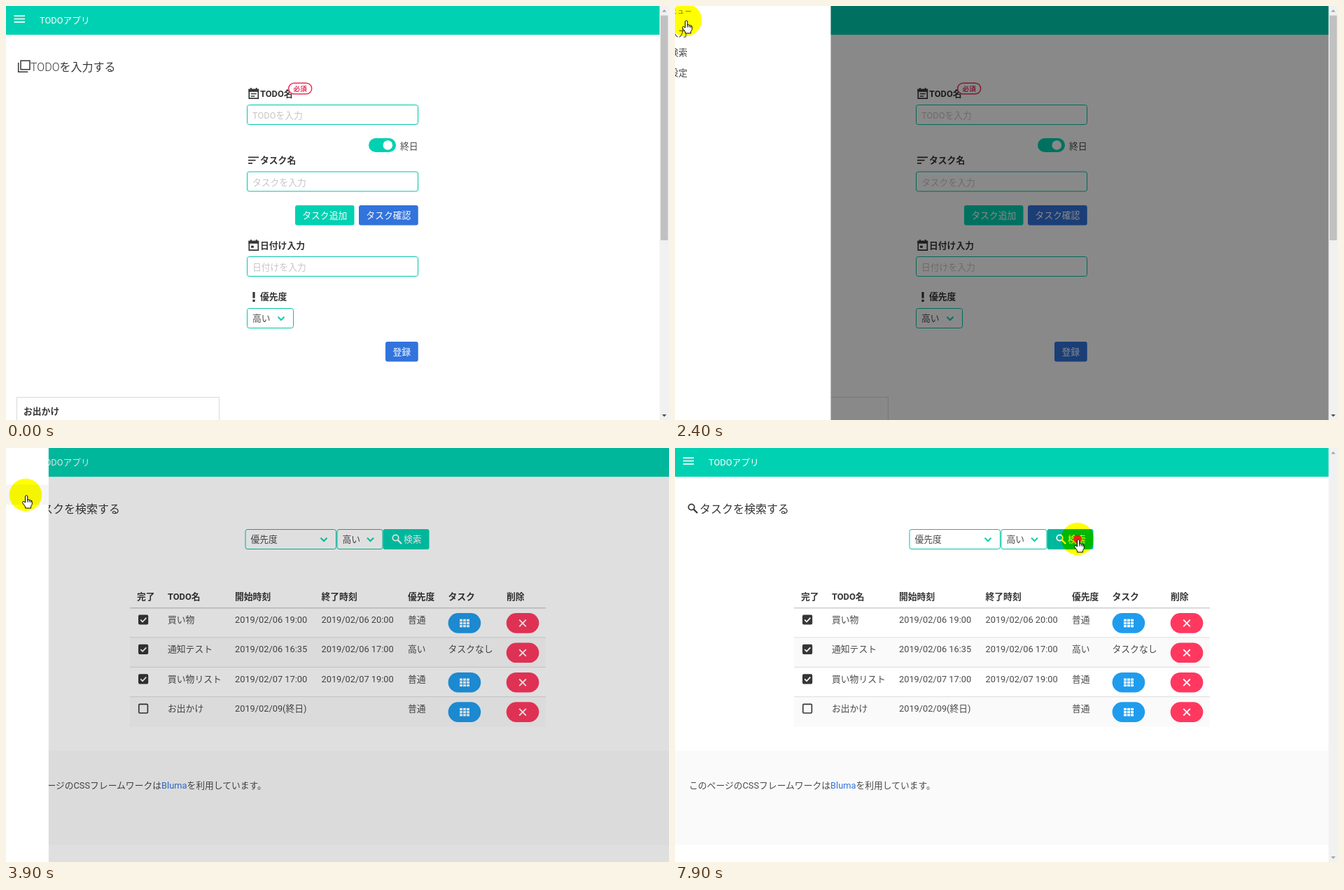
Recreate the animation shown at these times as an HTML page. Size 947x592 px, loop 8 s.

```html
<!DOCTYPE html>
<html lang="ja">
<head>
<meta charset="utf-8">
<title>TODOアプリ</title>
<style>
  html, body { margin: 0; width: 100%; height: 100%; overflow: hidden; background: #fff; }
  svg { display: block; }
  text { font: 400 12.8px Roboto, "Noto Sans CJK JP", "Noto Sans CJK", sans-serif; fill: #4a4a4a; }
  .bold { font-weight: 700; fill: #363636; }
  .title { font-size: 16px; font-weight: 300; fill: #363636; }
  .hint { fill: #c6c6c6; }
  .white { fill: #fff; }
  .mid { text-anchor: middle; }
  .tag { font-size: 9.6px; font-weight: 700; fill: #e8315b; }
  .small { font-size: 9.6px; letter-spacing: .96px; fill: #7a7a7a; }
  .box { fill: #fff; stroke: #00c4a7; }
  .line { fill: none; stroke: #363636; stroke-width: 1.7; }
  .cursor { fill: #fff; stroke: #000; stroke-linejoin: round; }
  #glow { fill: #ff0; mix-blend-mode: multiply; }
</style>
</head>
<body>
<svg id="stage" width="947" height="592" viewBox="0 0 947 592"></svg>
<script>
const PRIMARY = '#00d1b2', HOVER = '#00c4a7', ACTIVE = '#00b89c';
const BLUE = '#3273dc', INFO = '#209cee', RED = '#ff3860', DARK = '#363636';

const text = (x, y, s, cls = '') => `<text x="${x}" y="${y}" class="${cls}">${s}</text>`;
const rect = (x, y, w, h, fill, rx = 0, more = '') =>
  `<rect x="${x}" y="${y}" width="${w}" height="${h}" rx="${rx}" fill="${fill}" ${more}/>`;
const path = (d, cls = 'line', more = '') => `<path d="${d}" class="${cls}" ${more}/>`;
const box = (x, y, w) => `<rect x="${x + .5}" y="${y + .5}" width="${w - 1}" height="28" rx="3" class="box"/>`;
const field = (y, hint) => box(344, y, 245) + text(352, y + 20, hint, 'hint');
const chevron = (x, y) => path(`M${x - 4.5} ${y - 2.5}l4.5 4.5 4.5-4.5`, '',
  `fill="none" stroke="${PRIMARY}" stroke-width="2"`);
const select = (x, y, w, label) => box(x, y, w) + text(x + 8, y + 19, label) + chevron(x + w - 18, y + 15);
const button = (x, y, w, label, fill) =>
  rect(x, y, w, 28.6, fill, 3) + text(x + w / 2, y + 19, label, 'white mid');
const magnifier = (x, y, color) =>
  `<g fill="none" stroke="${color}"><circle cx="${x + 5}" cy="${y + 5}" r="4.2" stroke-width="1.8"/>` +
  `<path d="M${x + 8} ${y + 8}l5.5 5.5" stroke-width="2.3"/></g>`;
const calendar = (y, inner) =>
  path(`M347.3 ${y + 2.5}h13v12.7h-13z`) +
  path(`M346.5 ${y + 1.7}h14.6v4h-14.6zM349 ${y}h1.8v3h-1.8zM356.8 ${y}h1.8v3h-1.8z`, '', `fill="${DARK}"`) +
  path(inner);

const inputPage = () => `
  ${path('M21 78.3h13v12.4h-13zM17.7 81v13.2h13.6', 'line', 'style="stroke-width:1.5"')}
  ${text(35, 92.5, 'TODOを入力する', 'title')}
  ${rect(15.5, 559.5, 289, 60, '#fff', 0, 'stroke="#dadada"')}
  ${text(25, 583.5, 'お出かけ', 'bold')}
  <g class="centred">
    ${calendar(117, 'M349.8 125.5h8M349.8 129h5.5')}${text(363, 130, 'TODO名', 'bold')}
    ${rect(403.7, 110.2, 33, 15.6, '#fff', 7.8, 'stroke="#e8315b" stroke-width="1.5"')}
    ${text(420.2, 121.7, '必須', 'tag mid')}
    ${field(141, 'TODOを入力')}
    ${rect(518, 189, 39, 20, PRIMARY, 10)}<circle cx="545.3" cy="199" r="6.8" fill="#fff"/>
    ${text(563, 205, '終日')}
    ${path('M346 216.3h15M346 220.6h10.5M346 224.9h6')}${text(363, 225, 'タスク名', 'bold')}
    ${field(236.5, 'タスクを入力')}
    ${button(413, 285, 84.5, 'タスク追加', PRIMARY)}${button(504, 285, 84.7, 'タスク確認', BLUE)}
    ${calendar(334, 'M350 343.5h3.8M350 345h3.8')}${text(363, 346.8, '日付け入力', 'bold')}
    ${field(358, '日付けを入力')}
    ${path('M352.4 409h3.2v8.8h-3.2zM352.4 419.8h3.2v3.2h-3.2z', '', `fill="${DARK}"`)}
    ${text(363, 420.3, '優先度', 'bold')}
    ${select(344, 432, 67, '高い')}
    ${button(542, 480, 46.7, '登録', BLUE)}
  </g>`;

const columns = [180, 224, 320, 443.5, 567, 624.5, 708];
const headings = ['完了', 'TODO名', '開始時刻', '終了時刻', '優先度', 'タスク', '削除'];
const rows = [
  ['買い物', '2019/02/06 19:00', '2019/02/06 20:00', '普通', ''],
  ['通知テスト', '2019/02/06 16:35', '2019/02/06 17:00', '高い', 'タスクなし'],
  ['買い物リスト', '2019/02/07 17:00', '2019/02/07 19:00', '普通', ''],
  ['お出かけ', '2019/02/09(終日)', '', '普通', ''],
];

function tableRow(cells, i) {
  const top = 229 + i * 42.4, mid = top + 21.4, done = i < 3;
  let out = i % 2 ? rect(170, top, 594, 42.4, '#fafafa') : '';
  out += rect(170, top - 1, 594, i ? 1 : 1.5, i ? '#dbdbdb' : '#cfcfcf');
  out += rect(182.8, mid - 11.2, 12.6, 12.6, done ? DARK : 'none', 1.2, `stroke="${DARK}" stroke-width="1.6"`);
  if (done) out += path(`M185.2 ${mid - 4.8}l2.9 2.9 5.2-5.6`, '', 'fill="none" stroke="#fff" stroke-width="1.7"');
  out += cells.map((s, c) => text(columns[c + 1], mid - .4, s)).join('');
  if (!cells[4]) {
    out += rect(624.6, mid - 14.3, 46.6, 28.6, INFO, 14.3);
    for (let k = 0; k < 9; k++)
      out += rect(641 + k % 3 * 5, mid - 5.7 + Math.floor(k / 3) * 4.2, 4, 3.2, '#fff');
  }
  return out + rect(707.7, mid - 14.3, 46.6, 28.6, RED, 14.3) +
    path(`M726.2 ${mid - 4.7}l9.6 9.6m0-9.6l-9.6 9.6`, '', 'stroke="#fff" stroke-width="1.8"');
}

const searchPage = () => `
  ${magnifier(18.5, 79.5, DARK)}${text(35, 92.5, 'タスクを検索する', 'title')}
  ${rect(0, 433, 947, 134.5, '#fafafa')}
  <text x="20" y="486.5">このページのCSSフレームワークは<tspan fill="${BLUE}">Bluma</tspan>を利用しています。</text>
  <g class="centred">
    ${select(334.5, 116, 130.5, '優先度')}${select(465.5, 116, 66, '高い')}
    <rect id="search" x="531.5" y="116" width="66" height="29" rx="3"/>
    ${magnifier(544.5, 123.5, '#fff')}${text(561, 135, '検索', 'white')}
    ${headings.map((s, c) => text(columns[c], 216.5, s, 'bold')).join('')}
    ${rows.map(tableRow).join('')}
  </g>`;

const ROW_TOP = 23.6, ROW_H = 28.8, DRAWER = 240;
const stage = document.getElementById('stage');
stage.innerHTML = `
  ${rect(0, 0, 947, 592, '#fff')}
  ${rect(0, 41, 947, 1, '#dff3ef')}
  ${rect(0, 0, 947, 41, PRIMARY)}
  <rect id="burger" width="38.5" height="41" fill="${ACTIVE}"/>
  ${path('M11.5 14.2h15.5M11.5 18.5h15.5M11.5 22.8h15.5', '', 'stroke="#fff" stroke-width="1.7"')}
  ${text(48, 25.3, 'TODOアプリ', 'white')}
  <g id="input">${inputPage()}</g>
  <g id="list">${searchPage()}</g>
  <rect id="shade" width="947" height="592" fill="#000"/>
  <g id="drawer">
    ${rect(0, 0, DRAWER, 592, '#fff')}
    <rect id="row" width="${DRAWER}" height="${ROW_H}" fill="#f5f5f5"/>
    ${text(0, 11.3, 'メニュー', 'small')}
    ${['入力', '検索', '設定'].map((s, i) => text(9.6, 42.6 + i * ROW_H, s)).join('')}
  </g>
  <g id="scrollbar">
    ${rect(933.5, 0, 13.5, 592, '#f1f1f1')}
    <rect id="thumb" x="935" y="13.5" width="10.5" height="321.5" fill="#c1c1c1"/>
    ${path('M937 8.5l3.2-3.5 3.2 3.5z', '', 'fill="#a3a3a3"')}
    <path id="down" d="M937 584l3.2 3.5 3.2-3.5z"/>
  </g>
  <circle id="glow" r="23.2"/>
  <g id="pointer">
    <circle id="click" r="6" fill="#f01818" opacity=".9"/>
    <path id="hand" class="cursor" d="M-.5 11V1.8Q1.2-.4 2.8 1.8V7Q4.3 6 5.3 7.5Q6.8 6.7 7.5 8.2Q9.3 7.8 9.3 10V13.5L7.6 16.5V19H-.4V17L-4.3 11.5Q-4.6 9-2.6 9.4ZM2.8 7v3.5M5.3 7.5v3M7.5 8.2v2.6"/>
    <path id="arrow" class="cursor" d="M.5.5V13.5L3.5 10.8 5.6 15.5 7.8 14.5 5.8 10H9.8Z"/>
  </g>`;

const el = id => document.getElementById(id);
const set = (id, attrs) => { for (const k in attrs) el(id).setAttribute(k, attrs[k]); };
const show = (id, on) => { el(id).style.display = on ? '' : 'none'; };
const ease = p => (1 - Math.cos(Math.PI * Math.min(1, Math.max(0, p)))) / 2;

// Pointer stops: time, x, y
const stops = [
  [100, 82, 116], [800, 16, 28], [1100, 16, 28], [1400, 15, 20], [2700, 15, 20], [3300, 28, 67],
  [4200, 28, 67], [4800, 377, 190], [5500, 377, 190], [6000, 491, 162], [6300, 491, 162], [7200, 575, 130],
];

function pointerAt(t) {
  const next = stops.findIndex(s => s[0] > t);
  if (next < 1) return (next ? stops[stops.length - 1] : stops[0]).slice(1);
  const [t0, x0, y0] = stops[next - 1], [t1, x1, y1] = stops[next];
  const p = ease((t - t0) / (t1 - t0));
  return [x0 + (x1 - x0) * p, y0 + (y1 - y0) * p];
}

function draw(t) {
  const [x, y] = pointerAt(t);
  const visible = t >= 100;
  const open = ease((t - 1987) / 500) - ease((t - 3568) / 500);
  const locked = t >= 2600 && t < 4100;
  const searching = t >= 3600;
  const clicking = [1900, 3500, 7900].includes(t);
  const overBurger = visible && x < 38 && y < 41 && t < 2500;
  const overSearch = searching && x > 531 && y < 145;
  const row = Math.floor((y - ROW_TOP) / ROW_H);
  const hand = overBurger || overSearch || t >= 1900 && t < 4100;

  show('input', !searching);
  show('list', searching);
  for (const g of document.querySelectorAll('.centred'))
    g.setAttribute('transform', `translate(${locked ? 7 : 0} 0)`);
  show('burger', overBurger);
  set('search', { fill: overSearch ? (clicking ? ACTIVE : HOVER) : PRIMARY });

  set('shade', { 'fill-opacity': open / 2 });
  show('drawer', open > 0);
  set('drawer', { transform: `translate(${DRAWER * (open - 1)} 0)` });
  show('row', row >= 0 && row < 3);
  set('row', { y: ROW_TOP + row * ROW_H });

  show('scrollbar', !locked);
  show('thumb', !searching);
  set('down', { fill: searching ? '#a3a3a3' : '#505050' });

  show('glow', visible);
  set('glow', { cx: x, cy: y });
  show('pointer', visible);
  set('pointer', { transform: `translate(${x} ${y})` });
  show('click', clicking);
  show('hand', hand);
  show('arrow', !hand);
}

const start = performance.now();
function tick() {
  draw(Math.floor((performance.now() - start) % 8000 / 100) * 100);
  requestAnimationFrame(tick);
}
tick();
</script>
</body>
</html>
```
